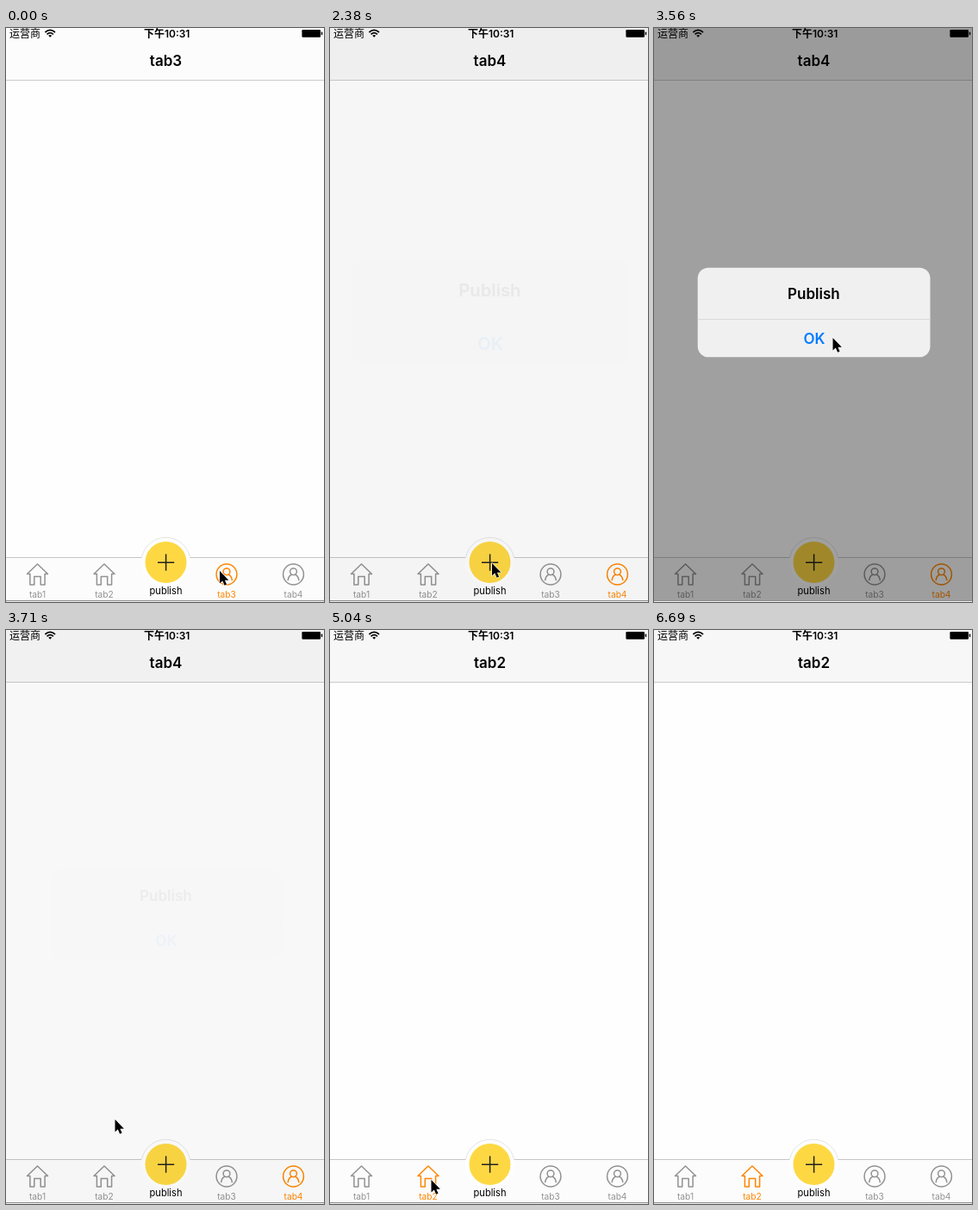
These frames come from a looping animation (369 by 665 pixels, 6840 ms). An HTML page:

```html
<!DOCTYPE html>
<html lang="zh">
<head>
<meta charset="utf-8">
<title>Tab bar</title>
<style>
  html, body { margin: 0; width: 100%; height: 100%; overflow: hidden; background: #fefefe; }
  svg { display: block; width: 369px; height: 665px; }
  text { font-family: Inter, "Noto Sans CJK SC", "Noto Sans CJK", sans-serif; text-anchor: middle; }
  .bold { font-size: 17px; font-weight: 600; }
  .tab { color: #929292; }
  .tab.on { color: #ff8500; }
  .tab text { font-size: 10.2px; fill: currentColor; }
  .tab path, .tab circle { fill: none; stroke: currentColor; stroke-width: 1.5; stroke-linejoin: round; stroke-linecap: round; }
</style>
</head>
<body>
<svg viewBox="0 0 369 665">
  <defs>
    <path id="home" d="M-12 12.5 L0 1 L12 12.5 H8.6 V25 H3.7 V15.5 H-3.7 V25 H-8.6 V12.5 Z"/>
    <g id="user">
      <circle cy="13" r="11.9"/>
      <circle cy="9.8" r="3.9"/>
      <path d="M-6.3 19.6 C-5.8 16 -4.2 14.2 -2 13.3 M6.3 19.6 C5.8 16 4.2 14.2 2 13.3"/>
    </g>
  </defs>

  <rect width="369" height="665" fill="#fefefe"/>
  <rect id="nav" width="369" height="60"/>
  <rect y="60" width="369" height="1" fill="#cbcbcb"/>

  <!-- status bar -->
  <text x="22" y="10.6" font-size="12">运营商</text>
  <g fill="none" stroke="#000" stroke-width="1.7">
    <path d="M45.4 5 Q51.2 -.2 57 5"/>
    <path d="M47.5 7.3 Q51.2 4 54.9 7.3"/>
  </g>
  <path d="M49.2 8.8 Q51.2 7.2 53.2 8.8 L51.2 10.8 Z"/>
  <text x="186.7" y="10.6" font-size="12" font-weight="600">下午10:31</text>
  <rect x="343.4" y="2" width="21.6" height="8.8" rx="1.2"/>
  <rect x="365.8" y="4.6" width="1.4" height="3.6" rx=".6"/>

  <text id="title" class="bold" x="185.5" y="44"></text>

  <!-- tab bar -->
  <rect y="613" width="369" height="50" fill="#fcfcfc"/>
  <rect y="613" width="369" height="1" fill="#c6c6c6"/>
  <circle cx="185.5" cy="618.5" r="28.5" fill="#fefefe"/>
  <path d="M157.6 613 A28.5 28.5 0 0 1 213.4 613" fill="none" stroke="#e4e4e4"/>
  <circle cx="185.5" cy="619" r="24" fill="#fed843"/>
  <path d="M176 619.2 H195.2 M185.6 609.6 V628.8" stroke="#222" stroke-width="1.5"/>
  <text x="185.5" y="656.4" font-size="11.1">publish</text>
  <g id="tabs"></g>

  <rect id="dim" width="369" height="663"/>

  <g id="alert">
    <rect x="50.7" y="277.7" width="269.8" height="103.6" rx="12.5" fill="#f0f0f0"/>
    <rect x="50.7" y="337" width="269.8" height="1" fill="#dadada"/>
    <text class="bold" x="185.4" y="313.6">Publish</text>
    <text class="bold" x="186" y="366.2" fill="#007aff">OK</text>
  </g>

  <rect y="663" width="369" height="1" fill="#8c8c8c"/>
  <rect y="664" width="369" height="1" fill="#f0f0f0"/>

  <path id="cursor" d="M0 0 V14.6 L3.3 11.6 L5.6 16.8 L8.1 15.7 L5.9 10.7 H10.4 Z"
    stroke="#fff" stroke-width="1.2" stroke-linejoin="round" paint-order="stroke"/>
</svg>

<script>
const LOOP = 6840;
const $ = id => document.getElementById(id);

// Each table holds its value until the next time: [ms, ...values]
const pointer = [
  [0, 248, 629], [150, 256, 631], [300, 285, 636], [440, 312, 639], [590, 328, 638], [740, 333, 638],
  [1490, 325, 644], [1630, 290, 646], [1780, 240, 640], [1930, 200, 626], [2080, 188, 620],
  [2970, 190, 600], [3120, 200, 500], [3260, 206, 400], [3410, 207, 362], [3560, 207.5, 359],
  [3710, 126.5, 567], [3850, 113, 628], [4000, 115, 636], [4150, 117, 638], [5040, 117.5, 637],
  [5340, 126, 642], [5490, 170, 658], [5640, 170, 700]
];
const selected = [[0, 3], [1040, 4], [4450, 2]];
const navColor = [[0, "#fcfcfc"], [2380, "#f7f7f7"]];
// dim opacity, alert opacity, alert scale
const dialog = [
  [0, 0, 0, 1], [2380, .03, .05, 1.19], [2520, .34, .93, 1.03], [2670, .37, 1, 1.003],
  [2820, .372, 1, 1], [3710, .022, .045, 1], [3850, 0, 0, 1]
];

const at = (table, t) => table.findLast(row => row[0] <= t).slice(1);

const places = { 1: 36.5, 2: 114, 3: 256, 4: 333.5 };
$("tabs").innerHTML = Object.entries(places).map(([n, x]) =>
  `<g class="tab" id="tab${n}" transform="translate(${x} 620)">
    <g>${$(n < 3 ? "home" : "user").outerHTML.replace(/ id="\w+"/, "")}</g>
    <text y="39.8">tab${n}</text></g>`).join("");

function draw(t) {
  const [x, y] = at(pointer, t);
  $("cursor").setAttribute("transform", `translate(${x} ${y})`);

  const [tab] = at(selected, t);
  $("title").textContent = "tab" + tab;
  for (const n in places) $("tab" + n).classList.toggle("on", +n === tab);
  $("nav").setAttribute("fill", at(navColor, t)[0]);

  const [dim, alpha, scale] = at(dialog, t);
  $("dim").setAttribute("opacity", dim);
  $("alert").setAttribute("opacity", alpha);
  $("alert").setAttribute("transform",
    `translate(185.5 329.2) scale(${scale}) translate(-185.5 -329.2)`);
}

const start = performance.now();
function tick() {
  draw((performance.now() - start) % LOOP);
  requestAnimationFrame(tick);
}
tick();
</script>
</body>
</html>
```
